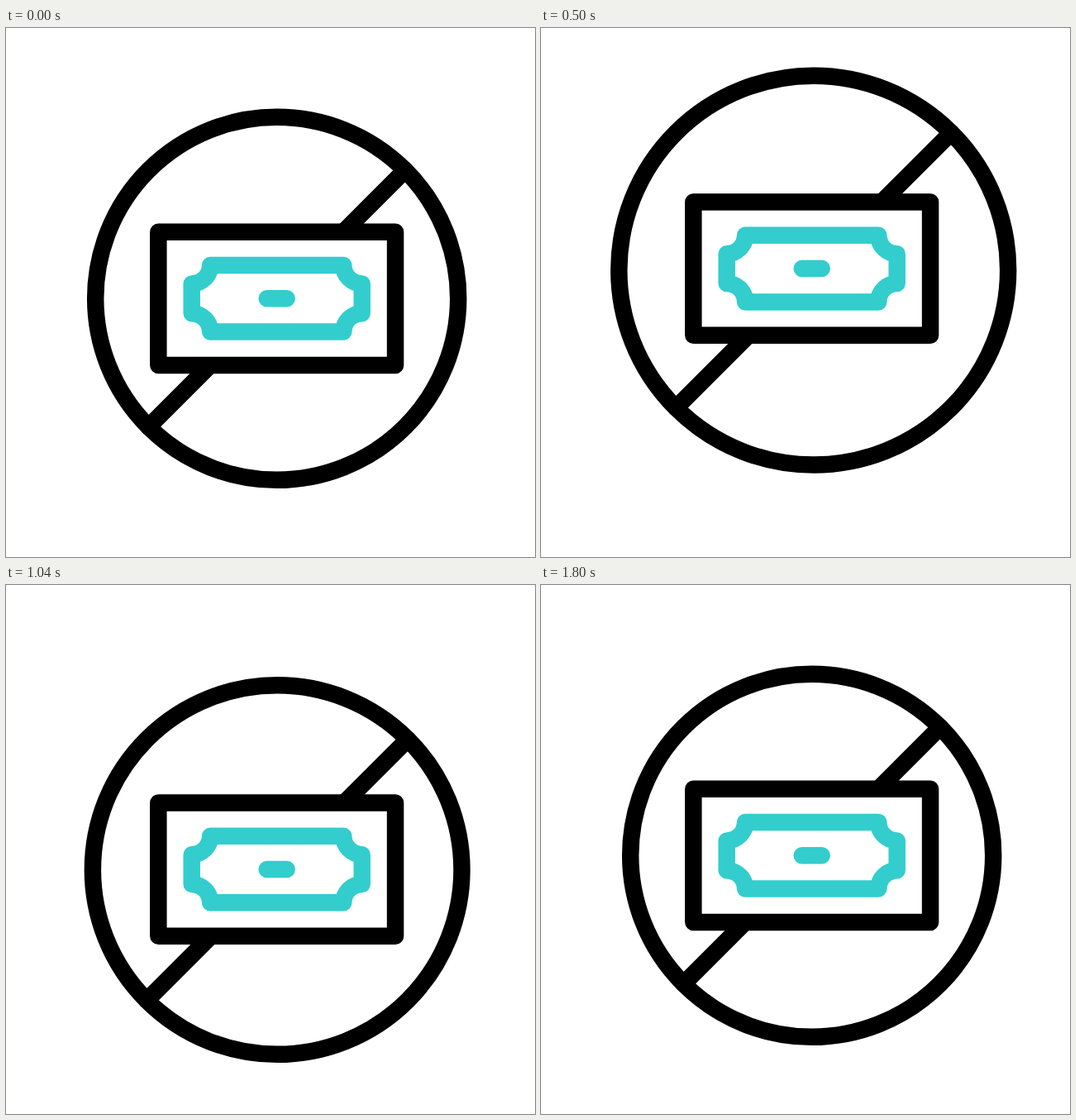
These frames come from a looping animation (640 px wide and 640 px high, 1.82 s). An HTML page:

```html
<!DOCTYPE html>
<html lang="en">
<head>
<meta charset="utf-8">
<title>No cash</title>
<style>
  html, body { margin: 0; width: 100%; height: 100%; overflow: hidden; background: #fff; }
  svg { display: block; width: 100%; height: 100%; }
  svg * { stroke-width: 20.48; stroke-linecap: round; stroke-linejoin: round; }
</style>
</head>
<body>
<svg viewBox="0 0 640 640">
  <g id="icon" fill="none" stroke="#000">
    <g id="sign">
      <circle id="ring"/>
      <line id="slash"/>
    </g>
    <rect x="-143.36" y="-80.64" width="286.72" height="161.28" fill="#fff"/>
    <g stroke="#33cdcd">
      <path d="M-80.6 -40.3H80.6A22.4 22.4 0 0 0 103 -17.9V17.9A22.4 22.4 0 0 0 80.6 40.3H-80.6A22.4 22.4 0 0 0 -103 17.9V-17.9A22.4 22.4 0 0 0 -80.6 -40.3Z"/>
      <path d="M-12 0H12"/>
    </g>
  </g>
</svg>
<script>
  const LOOP = 1820, STEP = 20, SEGMENT = 450;
  const CENTER = { x: 327.7, y: 327.3 };
  const HEIGHTS = [0, -38.4, 25.6, -12.8, 0];
  const GROWTH = [0, 16.5, 0, 16.5, 0];
  const BASE_RADIUS = 219.5;

  const [icon, sign, ring, slash] = ["icon", "sign", "ring", "slash"]
    .map(id => document.getElementById(id));

  function setAttributes(node, values) {
    for (const name in values) node.setAttribute(name, values[name]);
  }

  // Smooth easing between evenly spaced keys; the last key is held.
  function sample(keys, time) {
    const position = Math.min(time / SEGMENT, keys.length - 1);
    const i = Math.min(Math.floor(position), keys.length - 2);
    const u = position - i;
    return keys[i] + (keys[i + 1] - keys[i]) * u * u * (3 - 2 * u);
  }

  function draw(time) {
    const growth = sample(GROWTH, time);
    const radius = BASE_RADIUS + growth;
    const drift = growth * 0.127;
    const reach = radius * Math.SQRT1_2;
    const y = CENTER.y + sample(HEIGHTS, time);
    setAttributes(icon, { transform: `translate(${CENTER.x} ${y})` });
    setAttributes(sign, { transform: `translate(${drift} ${drift})` });
    setAttributes(ring, { r: radius });
    setAttributes(slash, { x1: -reach, y1: reach, x2: reach, y2: -reach });
  }

  function tick() {
    const time = performance.now() % LOOP;
    draw(Math.floor(time / STEP) * STEP);
    requestAnimationFrame(tick);
  }

  draw(0);
  requestAnimationFrame(tick);
</script>
</body>
</html>
```
